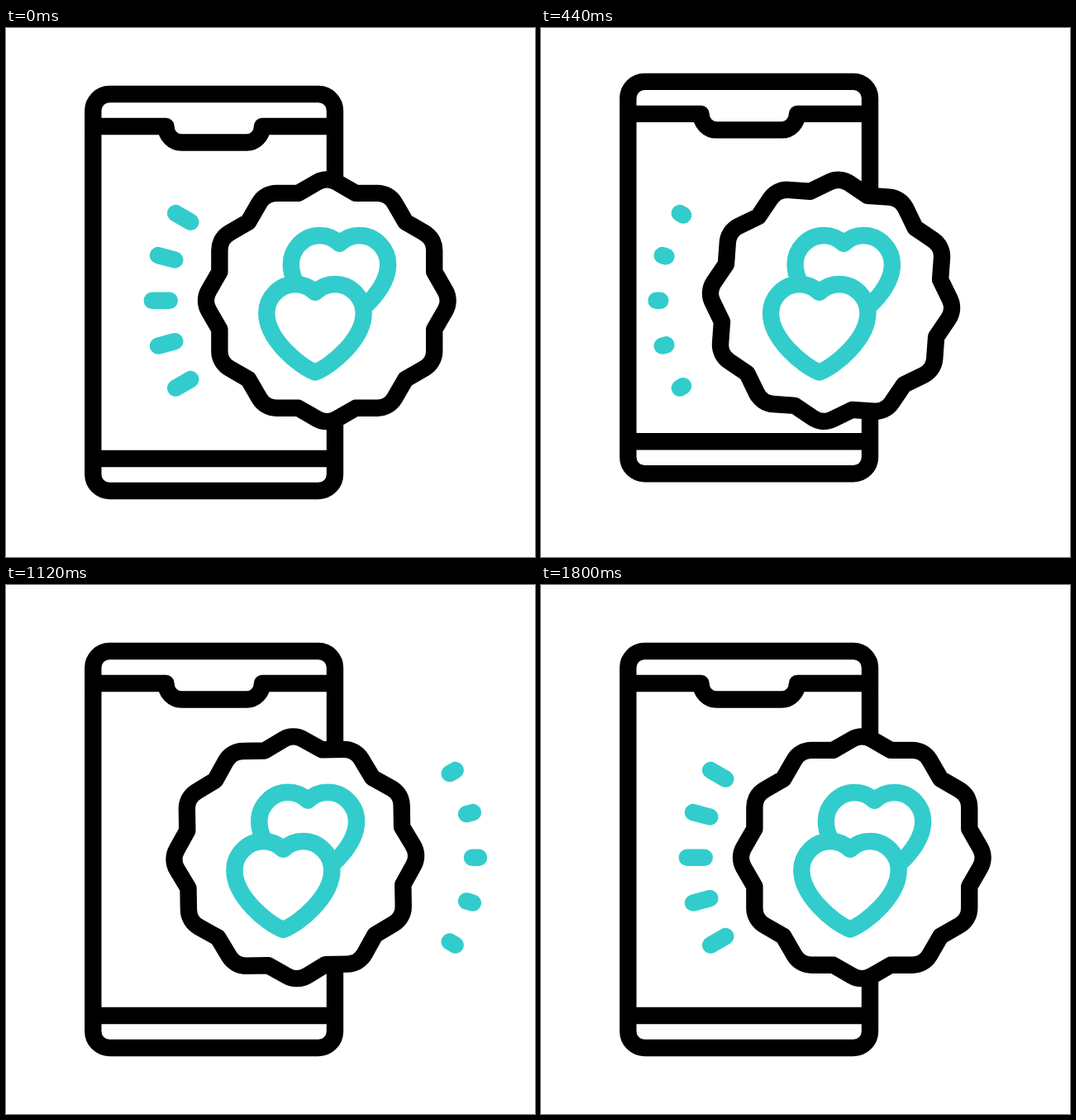
An HTML page for the animation above (2 s loop, 640 by 640 pixels).

```html
<!DOCTYPE html>
<html lang="en">
<head>
<meta charset="utf-8">
<title>Phone with hearts badge</title>
<style>
  html, body { margin: 0; width: 100%; height: 100%; overflow: hidden; background: #fff; }
  svg { display: block; width: 100%; height: 100%; }
  path { stroke: #000; stroke-width: 20.4; stroke-linecap: round; stroke-linejoin: round; fill: #fff; }
  .teal path { stroke: #3cc; }
  .line { fill: none; }
</style>
</head>
<body>
<svg viewBox="0 0 640 640">
  <path id="phone" class="line"/>
  <g class="teal">
    <path id="leftRays" class="line"/>
    <path id="rightRays" class="line"/>
  </g>
  <path id="badge"/>
  <g id="hearts" class="teal">
    <g id="backHeart"><path transform="translate(29.5 -59)"/></g>
    <g id="frontHeart"><path/></g>
  </g>
</svg>
<script>
const LOOP = 2000, STEP = 40, LEAD = 80, LAST = 43;
const CENTER = { x: 388.3, y: 329.8 };
const TRAVEL = 38.5;
const OUT_END = 10.4, BACK_START = 27.2;
const RAY_INNER = 190.5, RAY_OUTER = 211.5;

const $ = id => document.getElementById(id);
const clamp = (v, lo = 0, hi = 1) => Math.min(hi, Math.max(lo, v));
const progress = (k, from, to) => clamp((k - from) / (to - from));
const smooth = u => u * u * (3 - 2 * u);
const mix = (a, b, u) => a + (b - a) * u;
const polar = (r, deg, x = 0, y = 0) => {
  const a = deg * Math.PI / 180;
  return [x + r * Math.cos(a), y + r * Math.sin(a)];
};
const pt = p => p.map(v => v.toFixed(2)).join(' ');

// Eased value between [step, value] keys.
function keyed(keys, k) {
  let value = keys[0][1];
  for (let i = 1; i < keys.length; i++) {
    const [from, a] = keys[i - 1], [to, b] = keys[i];
    if (k >= from) value = mix(a, b, smooth(progress(k, from, to)));
  }
  return value;
}

// Leaves quickly, rests at 1, then accelerates home.
function outAndBack(k, outPower, backPower) {
  if (k < OUT_END) return 1 - (1 - k / OUT_END) ** outPower;
  return 1 - progress(k, BACK_START, LAST) ** backPower;
}

function badgePath() {
  const peak = 150, valley = 134.5, radius = 24, cut = 0.345;
  let d = '';
  for (let i = 0; i < 12; i++) {
    const a = i * 30;
    const top = polar(peak, a);
    const before = polar(valley, a - 15), after = polar(valley, a + 15);
    const toward = v => top.map((c, j) => mix(c, v[j], cut));
    d += `${i ? 'L' : 'M'}${pt(before)}L${pt(toward(before))}A${radius} ${radius} 0 0 1 ${pt(toward(after))}`;
  }
  return d + 'Z';
}

function phonePath(k) {
  const rise = keyed([[0, 0], [6, -36], [13, 17], [19, 0]], k);
  const base = keyed([[1, 0], [7, -32], [12, 0]], k);
  const top = 80 + rise, notch = 119 + rise, bottom = 560 + base;
  const bar = 521 + base + Math.max(0, rise) * 0.19;
  const l = 105.3, r = 398, c = 20;
  return `M${l + c} ${top}H${r - c}A${c} ${c} 0 0 1 ${r} ${top + c}V${bottom - c}` +
    `A${c} ${c} 0 0 1 ${r - c} ${bottom}H${l + c}A${c} ${c} 0 0 1 ${l} ${bottom - c}V${top + c}` +
    `A${c} ${c} 0 0 1 ${l + c} ${top}Z` +
    `M${l} ${notch}H193.5c0 11 8.5 19.5 19 19.5H291c10.500 0 19-8.500 19-19.500H${r}` +
    `M${l} ${bar}H${r}`;
}

function raysPath(x, facing, inner, outer) {
  if (outer - inner < 0.05) return '';
  return [-30, -15, 0, 15, 30].map(a =>
    `M${pt(polar(inner, facing + a, x, CENTER.y))}L${pt(polar(outer, facing + a, x, CENTER.y))}`).join('');
}

const grow = (x, y, s) => `translate(${x} ${y}) scale(${s}) translate(${-x} ${-y})`;

function draw(k) {
  const shift = -TRAVEL * outAndBack(k, 1.72, 2.1);
  const pulse = Math.sin(Math.PI * progress(k, OUT_END, BACK_START)) ** 2;
  const angle = -90 * outAndBack(k, 1.54, 1.78) - 19.7 * pulse;
  const x = CENTER.x + shift;

  $('phone').setAttribute('d', phonePath(k));
  $('badge').setAttribute('transform', `translate(${x} ${CENTER.y}) rotate(${angle})`);
  $('hearts').setAttribute('transform', `translate(${shift} 0)`);
  $('frontHeart').setAttribute('transform', grow(404, 299, 1 + 0.08 * pulse));
  $('backHeart').setAttribute('transform', grow(353.5, 295, 1 + 0.068 * pulse));

  const length = k < OUT_END
    ? 1 - (k / OUT_END) ** 1.78
    : progress(k, BACK_START, LAST) ** 2;
  $('leftRays').setAttribute('d',
    raysPath(x, 180, mix(RAY_OUTER, RAY_INNER, length), RAY_OUTER));

  const head = mix(RAY_INNER, RAY_OUTER, smooth(progress(k, 14, 23)));
  const tail = mix(RAY_INNER, RAY_OUTER, progress(k, 20.5, 29.4));
  $('rightRays').setAttribute('d', raysPath(360.5, 0, tail, head));
}

const HEART = 'M374 320C367.500 313.500 359 310 350 310C331 310 315.300 326 315.300 345' +
  'C315.300 376 354 409 374 416.500C394 409 432.700 376 432.700 345' +
  'C432.700 326 417 310 398 310C389 310 380.500 313.500 374 320Z';
document.querySelectorAll('#hearts path').forEach(p => p.setAttribute('d', HEART));
$('badge').setAttribute('d', badgePath());

const start = performance.now();
function tick() {
  const time = (performance.now() - start) % LOOP;
  draw(clamp(Math.floor((time - LEAD) / STEP), 0, LAST));
  requestAnimationFrame(tick);
}
tick();
</script>
</body>
</html>
```
